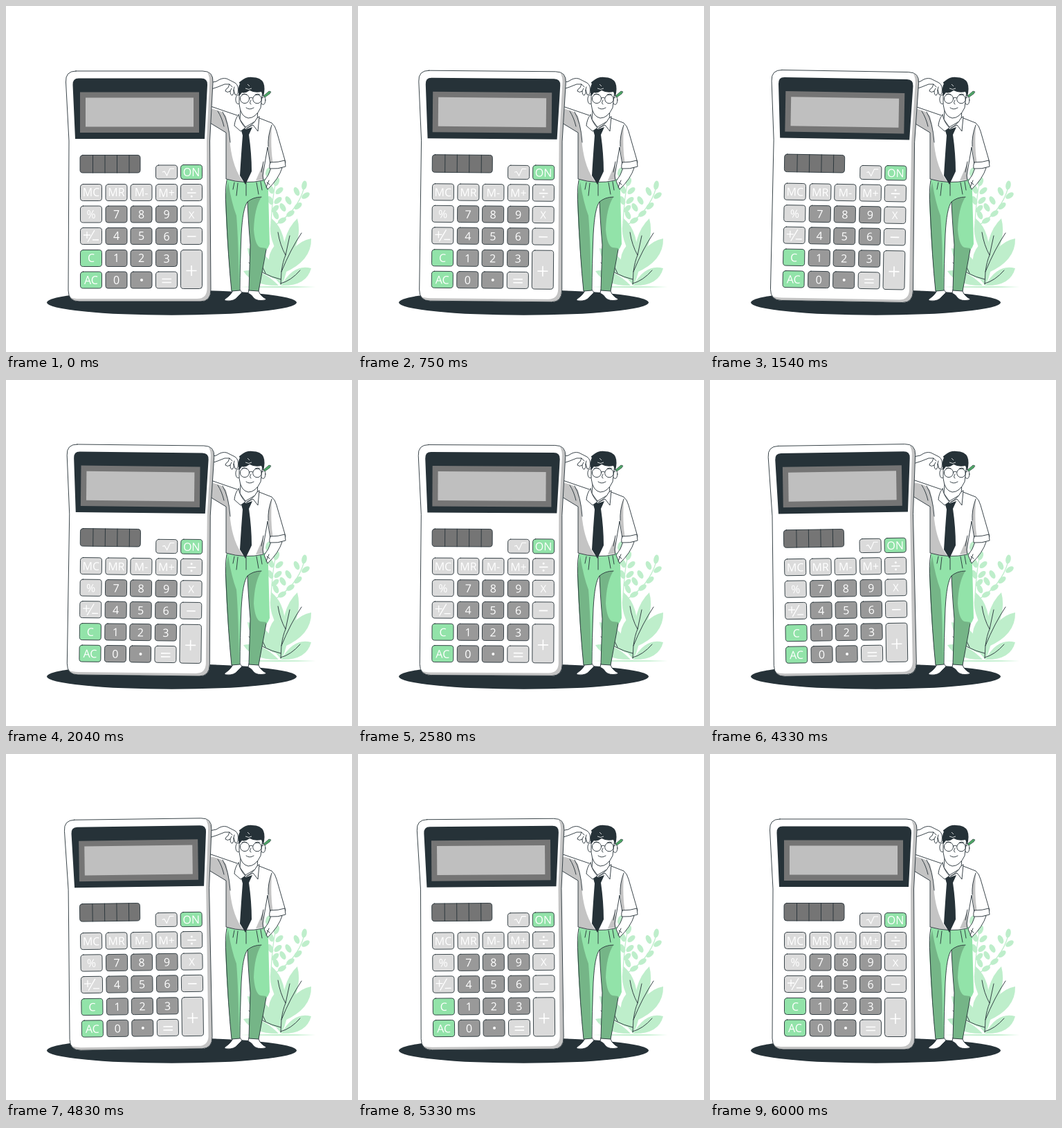
An HTML page for the animation above (6.04 s loop, 500x500 px).

```html
<!DOCTYPE html>
<html lang="en">
<head>
<meta charset="utf-8">
<title>Calculator</title>
<style>
html, body { margin: 0; width: 100%; height: 100%; overflow: hidden; background: #fff; }
svg { display: block; width: 100vw; height: 100vh; }
.ink { fill: none; stroke: #263238; stroke-width: .9; stroke-linecap: round; stroke-linejoin: round; }
.dark { fill: #263238; }
.white { fill: #fff; }
.green { fill: #92e3a9; }
.pale { fill: #beeecb; }
.shade { fill: #75b587; }
.grey { fill: #c4c4c4; }
.sign { fill: none; stroke: #fff; stroke-width: 1.6; }
text { font-family: "Open Sans", "Noto Sans", sans-serif; font-size: 16px; fill: #fff; text-anchor: middle; }
</style>
</head>
<body>
<svg viewBox="0 0 500 500">
  <g id="plants" class="pale">
    <path d="M338 406Q395 404 448 406Q395 408 338 406Z"/>
    <g fill="none" stroke="#beeecb" stroke-width="1.2">
      <path d="M383 320Q421 299 431 262M383 313Q385 275 390 254"/>
    </g>
  </g>
  <g class="ink">
    <path d="M397 402L398 384Q400 369 404 360M393 327Q396 346 404 360L410 332M398 384Q411 352 427 328M397 401Q412 397 425 382M397 395Q371 389 351 371M375 386L368 372"/>
  </g>
  <ellipse class="dark" cx="239.5" cy="428.5" rx="180.5" ry="18.2"/>

  <g id="man">
    <!-- shoes -->
    <path class="ink white" d="M328 411Q325 418 317 423Q314 426 319 426Q330 427 335 420L341 414L338 410Z"/>
    <path class="ink white" d="M351 410L350 415Q355 417 358 422Q363 427 374 425Q378 424 372 421Q366 417 364 410Z"/>
    <!-- trousers -->
    <path class="green" d="M319 251L378 250Q381 258 379 268L381 344Q379 350 376 353L365 412L351 411L353 345Q350 310 349 283Q342 292 340 330L338 411L326 412Q318 330 317 275Z"/>
    <path class="shade" d="M321 254Q326 285 333 303Q336 340 337 411L326 412Q318 330 317 275Z"/>
    <path class="shade" d="M349 283Q357 277 369 276Q359 292 358 323Q360 347 368 349L376 350L365 412L351 411L353 345Z"/>
    <path class="ink" d="M319 252Q316 267 318 291Q321 365 326 412L338 411Q338 375 340 330Q342 292 349 283Q350 310 353 345L351 411L365 412L376 352M349 283Q357 276 369 276M335 256L333 274M330 255L328 265M347 256V274M362 255L365 272M368 254L370 266M379 260Q380 255 378 250"/>
    <!-- far arm in the pocket -->
    <path class="ink white" d="M383 234Q380 245 373 253L378 265Q394 250 399 234Z"/>
    <path class="ink" d="M377 255L381 258M376 262L380 252"/>
    <!-- forearm and hand under the head -->
    <path class="ink white" d="M294 111L304 109Q312 103 319 105L331 111Q337 115 335 126Q333 130 331 128L329 121Q330 127 327 129Q324 129 324 123Q320 126 317 123Q317 120 321 118L323 113L316 113Q307 117 294 121Z"/>
    <path class="ink" d="M323 113L327 117M324 123L326 119M329 121L330 117"/>
    <!-- shirt -->
    <path class="white" d="M290 144L299 146L332 158L366 162L384 169Q389 173 391 181L404 227L382 230L378 204L371 245L372 252Q345 258 318 250L318 183L290 166Z"/>
    <path class="grey" d="M290 149L299 149Q312 151 318 159Q323 180 324 201Q328 235 343 254Q329 254 318 250V183L290 166Z"/>
    <path class="grey" d="M384 173Q378 187 379 203L382 228L386 228Q382 207 384 173ZM372 227L361 252L372 251Z"/>
    <path class="ink" d="M290 143L299 146L334 158M290 166L318 183V250Q345 258 372 252L371 245L378 204L382 229M366 162L384 169Q389 173 391 181L404 226M384 172Q378 188 379 203M313 153Q322 168 324 197M306 152Q312 161 315 174M372 225L369 240"/>
    <path class="ink white" d="M382 226Q394 226 403 223L404 232Q393 236 381 235Q380 230 382 226Z"/>
    <!-- neck, collar, tie -->
    <path class="ink white" d="M339 150L338 164L346 175L363 165L364 150Z"/>
    <path class="dark" d="M338 173L347 178L356 175L351 186Q355 214 355 239L346 258L338 245Q340 212 342 187Z"/>
    <path class="ink white" d="M336 157Q331 163 330 173L339 181L346 176Q338 168 336 157ZM366 160L364 181L357 172L347 177Q359 170 362 163Z"/>
    <!-- head -->
    <ellipse class="ink white" cx="335.5" cy="135" rx="3.6" ry="6.5"/>
    <ellipse class="ink white" cx="371.5" cy="136" rx="3.4" ry="6.5"/>
    <path class="ink white" d="M337 121L337 142Q339 160 350 162Q361 162 368 147L371 122Z"/>
    <path class="dark" d="M337 130Q334 120 338 112Q335 111 340 108Q347 102 356 103Q368 103 372 111Q375 118 372 131L369 124Q359 126 352 122Q345 127 341 125Z"/>
    <path fill="none" stroke="#fff" stroke-width=".8" d="M346 119Q351 122 355 119M349 113L352 116"/>
    <g class="ink">
      <circle class="white" cx="345" cy="134" r="6.6"/>
      <circle class="white" cx="363" cy="134.5" r="6.3"/>
      <path d="M351.5 133Q354 131 356.7 133M369 133L372 132M341 128Q345 126 348 128M360 128Q364 126 367 128M354 136Q351 141 354 142M347 147Q352 151 358 147"/>
    </g>
    <path d="M372 130L380 123L383 124L381 127L374 132Z" fill="#4ea866" stroke="#263238" stroke-width=".6"/>
  </g>

  <g id="calc">
    <path class="white" d="M101 94H284Q300 94 299 110L294.5 195L296 410Q296 427 281 427H106Q90 427 90 411L91 195L86.5 110Q85.500 94 101 94Z"/>
    <path class="grey" d="M291 96Q300 100 299 111L294.500 195L296 410Q296 427 281 427H106Q97 427 93 421Q98 423 106 423H276Q290 423 290.500 409L290 195L294 113Q295 102 291 96Z"/>
    <path class="ink" d="M101 94H284Q300 94 299 110L294.5 195L296 410Q296 427 281 427H106Q90 427 90 411L91 195L86.5 110Q85.500 94 101 94Z"/>
    <path class="dark" d="M105 104.500H282Q291.500 104.500 291 114L287 192H100L96.500 114Q96 104.500 105 104.500Z"/>
    <rect x="107" y="124.500" width="172" height="58.500" fill="#757575"/>
    <rect x="115" y="132.500" width="156" height="42" fill="#bfbfbf"/>
    <rect class="ink" style="fill:#757575" x="107" y="215.500" width="87" height="25.500" rx="4"/>
    <path class="ink" d="M125.500 215.500V241M143 215.500V241M160.500 215.500V241M178 215.500V241"/>
    <g id="keys"></g>
    <g class="sign">
      <path d="M226 240L229 239L232.500 245L237 235H243" stroke-width="1.100"/>
      <path d="M262 270H274.500M262 333H274.500M225.500 394.500H239M225.500 399.500H239M260.500 382.500H275.500M268 375V390"/>
      <path d="M112 331H122M117 326V336M118 341L128 324M125 338H134" stroke-width="1.300"/>
    </g>
    <g class="white">
      <circle cx="268.200" cy="265" r="1.500"/>
      <circle cx="268.200" cy="275" r="1.500"/>
      <circle cx="196" cy="396" r="2"/>
    </g>
  </g>
</svg>
<script>
const NS = "http://www.w3.org/2000/svg";
const byId = id => document.getElementById(id);

function add(parent, tag, attrs, text) {
  const el = document.createElementNS(NS, tag);
  for (const name in attrs) el.setAttribute(name, attrs[name]);
  if (text) el.textContent = text;
  parent.append(el);
}

// Broad leaves: base x, y, tip x, y, bulge
function leaf(x1, y1, x2, y2, bulge) {
  const dx = x2 - x1, dy = y2 - y1, len = Math.hypot(dx, dy);
  const nx = -dy / len * bulge, ny = dx / len * bulge;
  const side = s => [x1 + dx * .62 + nx * s, y1 + dy * .62 + ny * s].join(" ");
  add(byId("plants"), "path", {
    d: `M${x1} ${y1}Q${side(1)} ${x2} ${y2}Q${side(-1)} ${x1} ${y1}Z`
  });
}
[[400, 382, 421, 307, 18], [401, 386, 441, 336, 21], [398, 404, 441, 379, 19],
 [403, 372, 384, 307, 17], [396, 397, 349, 350, 21], [394, 404, 343, 383, 15],
 [398, 404, 389, 345, 26]].forEach(l => leaf(...l));

// Small leaves: centre x, y, turn
[[431, 259, 10], [420, 268, -25], [433, 274, 55], [408, 281, -30], [422, 289, 50],
 [400, 291, -30], [411, 300, 55], [390, 302, -25], [399, 310, 60],
 [391, 254, 20], [395, 267, 50], [383, 265, -20], [393, 281, 50], [382, 281, -25],
 [379, 240, 15], [389, 293, 45]].forEach(([x, y, turn]) =>
  add(byId("plants"), "ellipse", { cx: x, cy: y, rx: 3.7, ry: 6.6, transform: `rotate(${turn} ${x} ${y})` }));

const LIGHT = "#dbdbdb", MID = "#999", GREEN = "#92e3a9";
const cols = [107.5, 144, 180, 216.5, 252.5];
const rows = [257.5, 289, 320.5, 352.5, 384];
const labels = [
  ["MC", "MR", "M-", "M+", ""],
  ["%", "7", "8", "9", "X"],
  ["", "4", "5", "6", ""],
  ["C", "1", "2", "3", null],
  ["AC", "0", "", "", null]
];

function key(x, y, h, fill, label, size = 16) {
  const keys = byId("keys");
  add(keys, "rect", { x, y, width: 31, height: h, rx: 4, class: "ink", style: `fill:${fill}` });
  if (label) add(keys, "text", { x: x + 15.5, y: y + h / 2 + size * .375, style: `font-size:${size}px` }, label);
}

labels.forEach((row, r) => row.forEach((label, c) => {
  if (label === null) return;
  const isDigit = r > 0 && c > 0 && c < 4 && !(r === 4 && c === 3);
  const fill = c === 0 && r > 2 ? GREEN : isDigit ? MID : LIGHT;
  key(cols[c], rows[r], 24, fill, label, label === "X" ? 15 : 16);
}));
key(252.5, 352.5, 56, LIGHT);
key(216.5, 230, 20, LIGHT);
key(252.5, 229.5, 21, GREEN, "ON");

// Gentle sway: [time in ms, degrees]
const LOOP = 6040;
const sway = [[0, 0], [1500, 1], [4500, -1], [6000, 0], [LOOP, 0]];

function angleAt(t) {
  const i = sway.findIndex(step => step[0] > t);
  const [t0, a0] = sway[i - 1], [t1, a1] = sway[i];
  return a0 + (a1 - a0) * (t - t0) / (t1 - t0);
}

function draw() {
  const angle = angleAt(performance.now() % LOOP);
  byId("calc").setAttribute("transform", `rotate(${angle} 193 260.5)`);
  requestAnimationFrame(draw);
}
draw();
</script>
</body>
</html>
```
